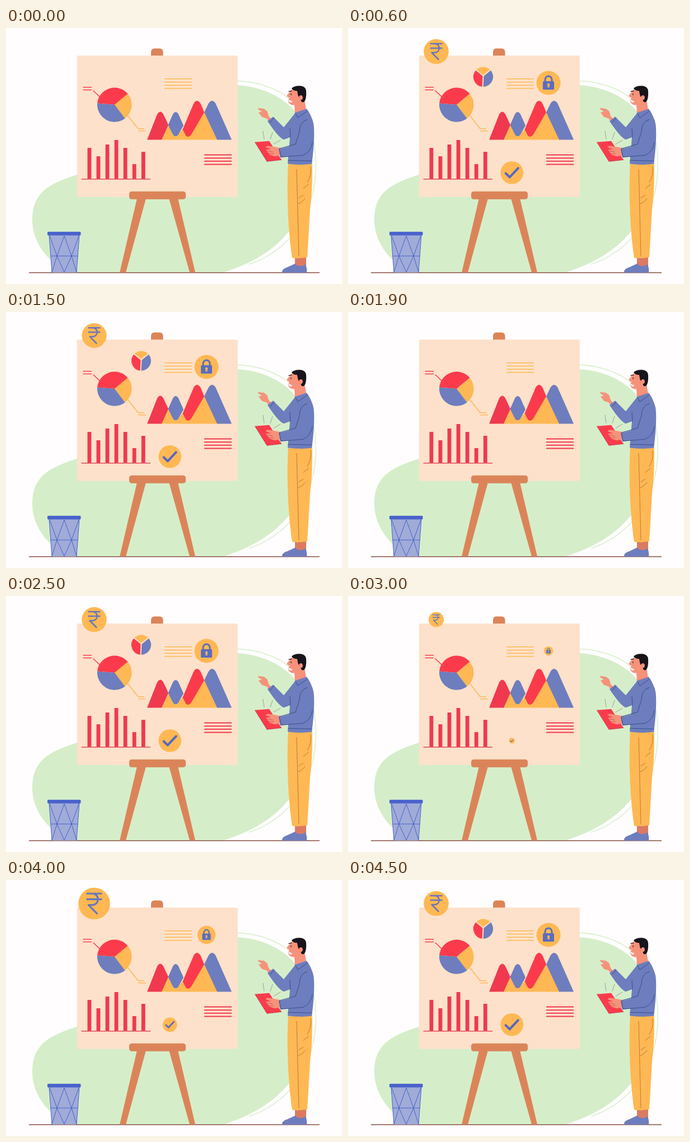
Animation of 600x457 px, one loop 4700 ms. Source, as an HTML page:

```html
<!DOCTYPE html>
<html lang="en">
<head>
<meta charset="utf-8">
<title>Board presentation</title>
<style>
  html, body { margin: 0; width: 100%; height: 100%; overflow: hidden; background: #fffdfe; }
  svg { display: block; width: 100vw; height: 100vh; }
  .red { fill: #fb3b4c; } .blue { fill: #6e7dbd; } .yellow { fill: #ffb853; }
  .green { fill: #d5eec9; } .wood { fill: #dc8459; } .skin { fill: #f6917a; }
  .crimson { fill: #f0394e; }
  .line { fill: none; stroke-linecap: round; stroke-linejoin: round; }
  .fold { stroke: #34508f; stroke-width: 1; }
</style>
</head>
<body>
<svg viewBox="0 0 600 457" preserveAspectRatio="none">
  <rect width="600" height="457" fill="#fffdfe"/>
  <path class="green" d="M116 437C75 421 45 381 47 338C49 296 72 279 128 261.500L260 210L414 102C470 106 515 133 536 180C557 235 546 301 520 343C486 396 440 420 387 437Z"/>
  <path class="line" stroke="#d5eec9" stroke-width="1.4" d="M414 94.500C472 97 520 124 541 172C559 222 557 280 537 328C517 374 480 406 435 421.500"/>
  <path stroke="#8b5346" stroke-width="1.6" d="M41 436.700H560"/>

  <g id="bin">
    <path fill="#a0abd8" d="M77 369H131L126 436.500H82Z"/>
    <path class="line" stroke="#4a62cc" stroke-width="1" d="M77 370L82 436M131 370L126 436M80 407H128M78 371L91 407L104 371L117 407L130 371M82 436L91 407L104 436L117 407L126 436"/>
    <rect x="74" y="363.700" width="59.500" height="6.500" rx="1.500" fill="#4a62cc"/>
  </g>

  <g id="easel">
    <path class="wood" d="M259 50V43Q259 36.500 265 36.500H274Q280.500 36.500 280.500 43V50Z"/>
    <path class="wood" d="M234 304H250L214 436.500H203ZM291 304H307L338 436.500H328Z"/>
    <rect x="126.800" y="49.300" width="287" height="252.500" rx="2.500" fill="#fee1ca"/>
    <rect class="wood" x="220" y="291.700" width="101" height="14" rx="4.500"/>
  </g>

  <g id="charts">
    <path class="red" d="M194 137L163 134.500A31 31 0 0 1 217.500 117.500Z"/>
    <path class="yellow" d="M194 137L217.500 117.500A31 31 0 0 1 212.500 161.500Z"/>
    <path class="blue" d="M194 137L212.500 161.500A31 31 0 0 1 163 134.500Z"/>
    <path class="line" stroke="#fb3b4c" stroke-width="1.500" d="M138 105.700H152.500M138 110.500H152.500M156 112L167 122.500"/>
    <path class="line" stroke="#ffb853" stroke-width="1.500" d="M218 157L236 179.700H246M237 183.700H249"/>
    <path stroke="#ffb853" stroke-width="1.500" d="M283 90.800H332M283 96.500H332M283 102.200H332M283 107.800H332"/>
    <path stroke="#f0394e" stroke-width="2" d="M354 226.500H403M354 232.200H403M354 237.800H403M354 243.500H403"/>
    <path class="yellow" d="M278 199.500L290 173L303 195L316 180L354 150L378 199.500Z"/>
    <path class="crimson" d="M252 199.500L270 154Q275.500 145 281 154L290 173L278 199.500Z"/>
    <path class="blue" d="M289.500 173L298 154Q303 146 308 154L317 174L308 190Q303 197 298 190Z"/>
    <path class="red" d="M315.500 181L335 135Q341 125 347.500 135L354 150.500L331 190Q326 197 321 192Z"/>
    <path class="blue" d="M354 150.500L361.500 135Q368 125 374.500 135L403 199.500H377Z"/>
    <g id="bars"></g>
    <path stroke="#e0485a" stroke-width="1.600" d="M134.500 269.700H258"/>
  </g>

  <g id="man" transform="translate(0 -.7)">
    <path fill="#db7a62" d="M516 408H536V428H516Z"/>
    <path class="blue" d="M493 437.500Q492 431 502 428L516 421.500Q522 427 529 425.500L535 423Q538 430 537 437.500Z"/>
    <path class="yellow" d="M504 242H546.500Q548 285 543 324L538 410Q524 413 511 411Q504 365 503 310Q502 275 504 242Z"/>
    <path class="line" stroke="#b87b3a" stroke-width="1" d="M544 248Q546 265 538 276M519 253L521 330L523 408M523 304L531 299M522 314Q528 313 534 305M540 280L531 287"/>
    <path class="skin" d="M512 109L508 113L501.500 121Q502 124 506 125L504 131Q506 139 515 138L516 154L536 147L533 128L524 109Z"/>
    <path fill="#17141b" d="M510 108.500Q515 103 526 104Q535 105 536 113Q537 128 532 133H528L525 126Q522 124 521 119L520 113Q513 113 510 108.500Z"/>
    <path class="skin" d="M523 123Q528 118 530 124Q530 130 525 129Z"/>
    <path fill="#fff" d="M505 129L512 132Q507 136 505 131Z"/>
    <path class="line" stroke="#17141b" stroke-width="1.200" d="M505 114L510 113M509 118V120"/>
    <path class="skin" d="M477 167L469 158L466.500 149.500L461 145L450 143.500Q449 146 457 150L451 151.500L457 159.500L466 162.500L470 170Z"/>
    <path class="blue" d="M516 152L537 145Q546 157 549.500 173Q552 200 546 243.500Q526 246 503 243L507 196L496 200Q487 197 467 167L477 159L496 178L516 153Z"/>
    <path class="red" d="M444.500 204.500L470 202.500L492 236L466 239Z"/>
    <path class="line" stroke="#b92f4b" stroke-width=".8" d="M444.500 204.500L466 239L492 236"/>
    <path class="skin" d="M491 215L480 213L468 211Q463 212 464 214L473 217L464 218L467 222L471 227L480 230L491 228Z"/>
    <path class="line" stroke="#b95953" stroke-width=".8" d="M467 220L476 222M470 225L478 225"/>
    <path class="blue" d="M533 164Q549 165 549 190Q549 221 538 226L490 232L487 217L518 209L525 184Z"/>
    <path class="line fold" d="M538 164Q524 168 524 186L517 208L488 216L491 231L530 228Q545 222 547 205M507 180L508 196M479 161L472 169M517 153L521 161L538 149M504 237L546 238"/>
    <path class="line" stroke="#9b9ca6" stroke-width="1" d="M459 185L461 199M476 187L472 199M490 201L478 208"/>
  </g>

  <g id="rupee">
    <circle class="yellow" r="22.300"/>
    <path class="line" stroke="#6877b8" stroke-width="2.500" d="M-10 -14H10M-10 -6H10M-8 -14H-3C8 -14 8 2 -3 2H-8L4 14"/>
  </g>
  <g id="pie">
    <path class="yellow" d="M0 0L-13 -12A18 18 0 0 1 13 -12Z"/>
    <path class="blue" d="M0 0L13 -12A18 18 0 0 1 -1 18Z"/>
    <path class="red" d="M0 0L-1 18A18 18 0 0 1 -13 -12Z"/>
    <path class="line" stroke="#fee1ca" stroke-width="2" d="M-14 -13L0 -2L14 -13M0 -2L-1 19"/>
  </g>
  <g id="lock">
    <circle class="yellow" r="21.500"/>
    <path class="line" stroke="#5b6dbf" stroke-width="3" d="M-6 -2V-6A6 6 0 0 1 6 -6V-2"/>
    <rect x="-10" y="-3" width="20" height="15" rx="1.500" fill="#5b6dbf"/>
    <path class="yellow" d="M-2.300 3A2.300 2.300 0 1 1 1.300 5L2 8H-2L-1.300 5Z"/>
  </g>
  <g id="check">
    <circle class="yellow" r="20.300"/>
    <path class="line" stroke="#5266c5" stroke-width="4" d="M-11 1L-4 8L11 -8"/>
  </g>
</svg>
<script>
  const LOOP = 4700, CYCLE = LOOP / 5, STEP = 100, CUT = 850;
  const $ = id => document.getElementById(id);

  const barTops = [214, 229, 208, 200, 214, 243, 221];
  $('bars').innerHTML = barTops.map((top, i) =>
    `<rect class="crimson" x="${145.5 + i * 16.05}" y="${top}" width="6.8" height="${270 - top}"/>`).join('');

  // Each icon pops in on its own [time, scale] curve.
  const icons = [
    { el: $('rupee'), x: 157.5, y: 42, keys: [[110, 0], [225, 1], [240, 1.27], [262, 1.27], [300, 1.1], [320, 1], [420, .92], [580, 1]] },
    { el: $('lock'), x: 358, y: 98, keys: [[120, 0], [260, .88], [300, 1.2], [360, 1.08], [420, 1]] },
    { el: $('check'), x: 292.7, y: 258.3, keys: [[140, 0], [260, .76], [320, 1], [340, 1.24], [360, 1.12], [420, 1]] },
    { el: $('pie'), x: 241.5, y: 87, keys: [[270, 0], [400, 1.12], [490, .95], [580, 1]] }
  ];

  function scaleAt(keys, t) {
    if (t >= CUT || t <= keys[0][0]) return 0;
    const i = keys.findIndex(key => key[0] > t);
    if (i < 0) return 1;
    const [t0, s0] = keys[i - 1], [t1, s1] = keys[i];
    return s0 + (s1 - s0) * (t - t0) / (t1 - t0);
  }

  function draw(time) {
    const t = Math.floor(time % LOOP / STEP) * STEP;
    for (const { el, x, y, keys } of icons) {
      const scale = scaleAt(keys, t % CYCLE);
      el.setAttribute('visibility', scale ? 'visible' : 'hidden');
      el.setAttribute('transform', `translate(${x} ${y}) scale(${scale})`);
    }
  }

  const start = performance.now();
  function tick() {
    draw(performance.now() - start);
    requestAnimationFrame(tick);
  }
  tick();
</script>
</body>
</html>
```
